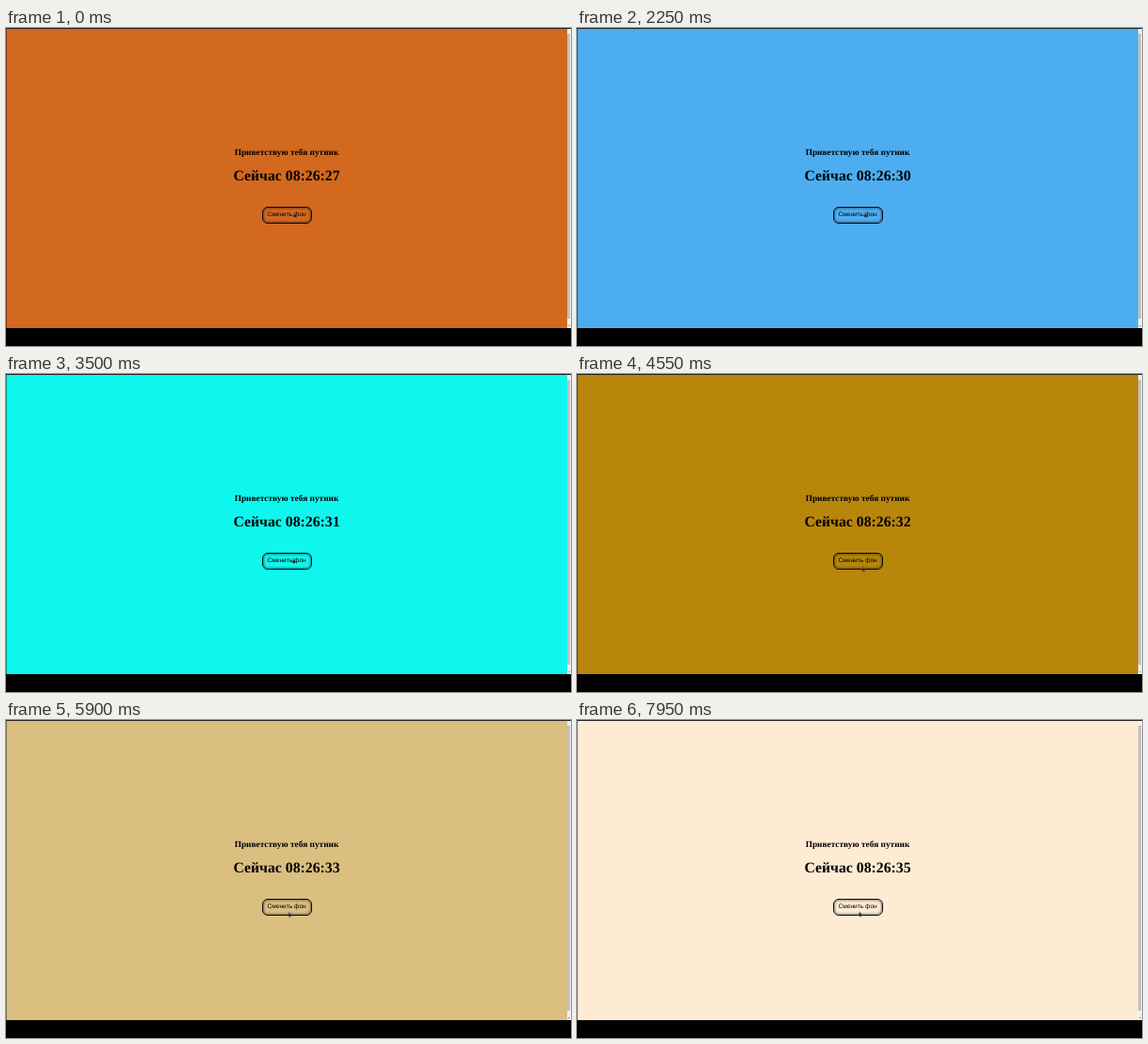
An HTML page for the animation above (8000 ms loop, 600 px wide and 338 px high).

```html
<!DOCTYPE html>
<html lang="ru">
<head>
<meta charset="utf-8">
<title>Сменить фон</title>
<style>
  html, body { margin: 0; width: 100%; height: 100%; overflow: hidden; background: #000; }
  .stage { position: relative; width: 600px; height: 338px; overflow: hidden; background: #000; color: #000; text-rendering: geometricPrecision; }
  .stage > * { position: absolute; box-sizing: border-box; }

  .page {
    left: 0; top: 1px; width: 596px; height: 318px;
    border-left: 1px solid rgba(0, 0, 0, .4);
    animation: tint 8s linear infinite;
  }
  .top { left: 0; top: 0; width: 600px; height: 1px; background: #242424; }

  .scroll { left: 595.5px; top: 1px; width: 4.5px; height: 318px; background: #f0f0f0; }
  .scroll::before { content: ""; position: absolute; left: .8px; top: 5px; width: 3.2px; height: 303px; background: #c1c1c1; }
  .scroll::after {
    content: ""; position: absolute; left: 1.2px; bottom: 2px;
    border: 1.2px solid transparent; border-top-color: #505050; border-bottom: 0;
  }

  .greeting, .clock { left: 0; width: 596px; text-align: center; font-family: "Liberation Serif", serif; font-weight: bold; white-space: nowrap; }
  .greeting { top: 127px; font-size: 9.36px; line-height: 12px; }
  .clock { top: 148px; height: 20px; overflow: hidden; font-size: 15.75px; line-height: 20px; }
  .lines { animation: tick 8s step-end infinite; }

  .button {
    left: 271.5px; top: 189.5px; width: 53.2px; height: 18.5px;
    border: 1.5px solid #0b0b12; border-radius: 6px;
    box-shadow: inset 0 0 2.5px .8px rgba(0, 0, 0, .5);
    font: 6.6px/16.4px "Liberation Sans", sans-serif; text-align: center; white-space: nowrap;
  }
  .cursor { left: 0; top: 0; width: 5.5px; height: 6px; animation: drift 8s linear infinite; }

  @keyframes tint {
    0%, 11% { background-color: #d2691e; }
    16.9% { background-color: #98859c; }
    21%, 26% { background-color: #6495ed; }
    35%, 43% { background-color: #00ffff; }
    54%, 59% { background-color: #b8860b; }
    64%, 65% { background-color: #daa520; }
    69.4% { background-color: #d8aa40; }
    80%, 81.8% { background-color: #dcdcdc; }
    83.75% { background-color: #e4dee0; }
    93%, 100% { background-color: #feebd3; }
  }
  @keyframes tick {
    0% { transform: translateY(0); }
    2.5% { transform: translateY(-20px); }
    15% { transform: translateY(-40px); }
    27.5% { transform: translateY(-60px); }
    40% { transform: translateY(-80px); }
    52.5% { transform: translateY(-100px); }
    65% { transform: translateY(-120px); }
    77.5% { transform: translateY(-140px); }
    90%, 100% { transform: translateY(-160px); }
  }
  @keyframes drift {
    0%, 17% { transform: translate(304px, 196px); }
    37.5%, 46% { transform: translate(303px, 196px); }
    55%, 58% { transform: translate(301.5px, 204.5px); }
    69%, 76% { transform: translate(298.5px, 203.7px); }
    82%, 100% { transform: translate(298px, 203.5px); }
  }
</style>
</head>
<body>
<div class="stage">
  <div class="page"></div>
  <div class="top"></div>
  <div class="scroll"></div>
  <div class="greeting">Приветствую тебя путник</div>
  <div class="clock"><div class="lines"></div></div>
  <div class="button">Сменить фон</div>
  <svg class="cursor" viewBox="0 0 6 7">
    <path d="M1.6 .6 L2.6 .6 L2.8 2.4 L5 3 L4.8 5 L4.2 6.2 L2 6.2 L.7 4 L1.6 3.8Z" fill="#1b1b22" stroke="#8f95a5" stroke-width=".4"/>
  </svg>
</div>
<script>
  const lines = document.querySelector('.lines');
  for (let second = 27; second <= 35; second++) {
    const line = document.createElement('div');
    line.textContent = `Сейчас 08:26:${second}`;
    lines.append(line);
  }
</script>
</body>
</html>
```
